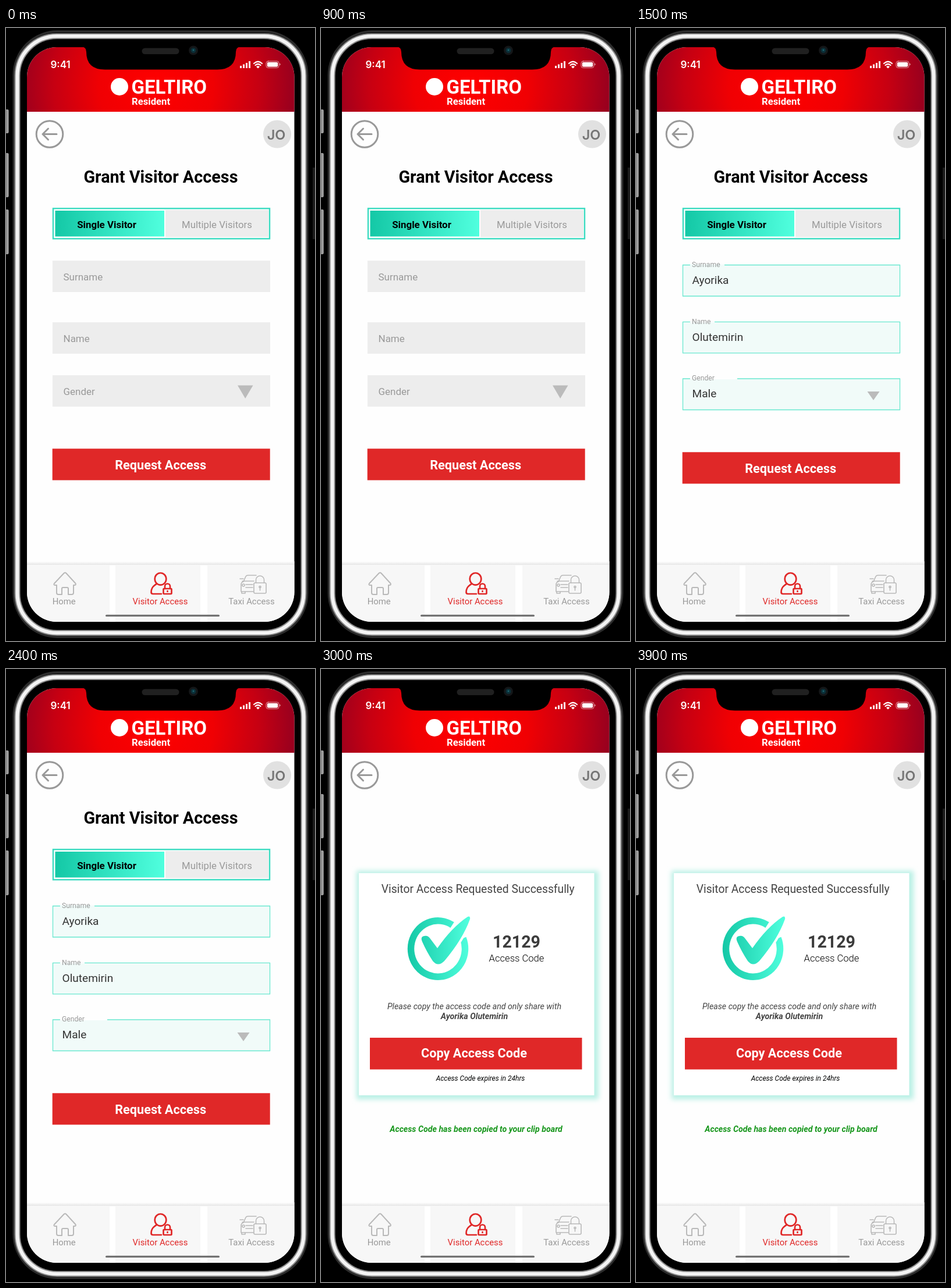
Animation of 531x1054 px, one loop 4.5 s. Source, as an HTML page:

```html
<!DOCTYPE html>
<html lang="en">
<head>
<meta charset="utf-8">
<title>Visitor access</title>
<style>
html, body { margin: 0; height: 100%; overflow: hidden; background: #000; }
svg { display: block; width: 100vw; height: 100vh; font-family: Roboto, sans-serif; }
.mid { text-anchor: middle; }
.b { font-weight: 700; }
.i { font-style: italic; }
.line { fill: none; stroke-linecap: round; stroke-linejoin: round; }
.tab { font-size: 14.9px; text-anchor: middle; }
.hint { font-size: 17px; fill: #999; }
.label { font-size: 12.2px; fill: #999; }
.value { font-size: 19.1px; fill: #333; }
.btn { font-size: 21.7px; font-weight: 700; fill: #fff; text-anchor: middle; }
.btnbox { fill: #e02828; }
</style>
</head>
<body>
<svg viewBox="0 0 531 1054">
<defs>
  <radialGradient id="red" gradientUnits="userSpaceOnUse" cx="258" cy="100" r="245">
    <stop offset="0" stop-color="#ff0000"/><stop offset=".4" stop-color="#f00003"/>
    <stop offset=".72" stop-color="#c60012"/><stop offset="1" stop-color="#930020"/>
  </radialGradient>
  <linearGradient id="teal"><stop offset="0" stop-color="#14c8a6"/><stop offset="1" stop-color="#50ffde"/></linearGradient>
  <linearGradient id="tick" gradientUnits="userSpaceOnUse" x1="149" y1="0" x2="256" y2="0">
    <stop offset="0" stop-color="#14c8a6"/><stop offset="1" stop-color="#50ffde"/>
  </linearGradient>
  <linearGradient id="key"><stop offset="0" stop-color="#666"/><stop offset="1" stop-color="#b4b4b4"/></linearGradient>
  <linearGradient id="fade" x2="0" y2="1"><stop offset="0" stop-color="#fff"/><stop offset="1" stop-color="#e6e6e6"/></linearGradient>
  <filter id="blur" x="-10%" y="-10%" width="120%" height="120%"><feGaussianBlur stdDeviation="4.500"/></filter>
  <clipPath id="screen"><rect x="36" y="33" width="459.500" height="988" rx="51"/></clipPath>
</defs>

<!-- phone body -->
<rect width="531" height="1054"/>
<g fill="url(#key)">
  <rect x="-3" y="140" width="7.500" height="41" rx="2"/>
  <rect x="-3" y="215" width="7.500" height="76" rx="2"/>
  <rect x="-3" y="312" width="7.500" height="77" rx="2"/>
</g>
<rect x="527" y="240" width="6" height="123" fill="#1c1c1c"/>
<g fill="none">
  <rect x="13.500" y="6" width="504" height="1041" rx="75" stroke="#2c2c2c" stroke-width="4"/>
  <rect x="19.500" y="14" width="492" height="1026" rx="68" stroke="#8c8c8c" stroke-width="10"/>
  <rect x="19.500" y="14" width="492" height="1026" rx="68" stroke="#f4f4f4" stroke-width="6"/>
</g>

<g clip-path="url(#screen)">
  <rect x="36" y="33" width="460" height="988" fill="#fefefe"/>
  <rect x="36" y="33" width="460" height="111" fill="url(#red)"/>

  <!-- tab bar -->
  <rect x="36" y="917" width="460" height="6" fill="url(#fade)"/>
  <rect x="36" y="923" width="460" height="98" fill="#f7f7f7"/>
  <path d="M178 924h10v97h-10zM334 924h12v97h-12z" fill="#fff"/>
  <g class="line" stroke="#b9b9b9" stroke-width="2">
    <path d="M83 955L99.500 937.500Q101.500 935.500 103.500 937.500L119.500 955Q121 958 117 958H116V971Q116 974 113 974H107V964Q107 962 105 962H98Q96 962 96 964V974H90Q87 974 87 971V958H85Q81 958 83 955Z"/>
    <g stroke-width="1.600">
      <path d="M425 969H404V957Q404 953 408 952L412 943Q413 941 416 941H430M406 951H426M402 947H408M412 957H424M412 962H424M405 969V972H411V969"/>
      <circle cx="408" cy="958" r="2"/>
      <rect x="426" y="954" width="21" height="18" rx="2"/>
      <path d="M429.500 954V949A7 7 0 0 1 443.500 949V954M436.500 962V967"/>
      <circle cx="436.500" cy="961" r="1.500"/>
    </g>
  </g>
  <g class="line" stroke="#e02828" stroke-width="2.700">
    <ellipse cx="265.500" cy="947.300" rx="9.800" ry="10.300"/>
    <path d="M258.500 956Q249.500 961 249.500 970Q249.500 973 252.500 973H267"/>
    <rect x="270.500" y="964" width="14" height="9" rx="1"/>
    <path d="M273 964V960A4.500 4.500 0 0 1 282 960V964M277.500 968V969"/>
  </g>
  <text class="tab" x="99.700" y="991" fill="#999">Home</text>
  <text class="tab" x="265" y="991" fill="#e02828">Visitor Access</text>
  <text class="tab" x="422" y="991" fill="#999">Taxi Access</text>
  <rect x="171" y="1008.700" width="196" height="3.400" rx="1.700" fill="#717171"/>
</g>

<!-- notch -->
<path d="M130 32Q138 33 138 41Q138 71.500 170 71.500H363Q395 71.500 395 41Q395 33 403 32Z"/>
<rect x="233.500" y="34.500" width="64" height="10.500" rx="5.250" fill="#202020"/>
<circle cx="322" cy="38.500" r="8" fill="#141618"/>
<circle cx="322" cy="38.500" r="4.500" fill="#0b2f38"/>
<circle cx="322" cy="38" r="1.500" fill="#1d6670"/>

<!-- status bar -->
<g fill="#fff">
  <text x="76.500" y="69" style="font:600 17px Inter,sans-serif">9:41</text>
  <path d="M402 65h3v4h-3zM407 62.500h3v6.500h-3zM412 60h3v9h-3zM417 57h3v12h-3z"/>
  <path d="M433 69.500L430 66.500Q433 64 436 66.500Z"/>
  <g class="line" stroke="#fff" stroke-width="2.200" stroke-linecap="butt">
    <path d="M426 61Q433 54.500 440 61M428.500 64Q433 60 437.500 64"/>
    <rect x="447" y="57" width="22" height="11.500" rx="3.500" stroke-width="1" opacity=".6"/>
  </g>
  <rect x="448.800" y="58.800" width="18.400" height="8" rx="2"/>
  <path d="M470.500 60.500q2 2 0 4z"/>

  <circle cx="195" cy="101" r="15"/>
  <text class="b" x="215.500" y="113" font-size="33">GELTIRO</text>
  <text class="b" x="216" y="132" font-size="16.700">Resident</text>
</g>

<!-- top controls -->
<g class="line" stroke="#999" stroke-width="3">
  <circle cx="75" cy="182.500" r="22.800"/>
  <path d="M87 182.500H63.500M72.500 173L63 182.500L72.500 192"/>
</g>
<circle cx="466" cy="182.500" r="24" fill="#e1e1e1"/>
<text class="mid" x="464.500" y="192" fill="#757575" style="font:600 23.500px Inter,sans-serif">JO</text>

<g id="form">
  <text class="b mid" x="266" y="266" font-size="28.800">Grant Visitor Access</text>
  <rect x="81" y="310.300" width="372" height="52" fill="#fff" stroke="#3adbc0" stroke-width="2.400"/>
  <rect x="274" y="313" width="177" height="46.500" fill="#ededed"/>
  <rect x="84.500" y="314" width="187.500" height="44.500" fill="url(#teal)"/>
  <text class="b mid" x="173" y="344" font-size="16.900">Single Visitor</text>
  <text class="mid" x="362.500" y="344" font-size="16.800" fill="#999">Multiple Visitors</text>
</g>

<g id="empty">
  <path d="M80 400h374v54H80zM80 506h374v54H80zM80 597h374v54H80z" fill="#ededed"/>
  <text class="hint" x="98.500" y="433.500">Surname</text>
  <text class="hint" x="98.500" y="540">Name</text>
  <text class="hint" x="98.500" y="630.500">Gender</text>
  <path d="M398 614.500H424.500L411.200 637Z" fill="#bbb"/>
  <rect class="btnbox" x="79.700" y="723.300" width="374" height="54.200"/>
  <text class="btn" x="265.700" y="758.500">Request Access</text>
</g>

<g id="filled">
  <path d="M80.500 407.500h373v53.500h-373zM80.500 505.300h373v53.500h-373zM80.500 603h373v53.500h-373z" fill="#f1fbf9" stroke="#68e8cf" stroke-width="1.300"/>
  <path d="M93 406.500h59v2h-59zM93 504.300h42v2h-42zM93 602h81v2h-81z" fill="#fff"/>
  <text class="label" x="96" y="410.500">Surname</text>
  <text class="label" x="96" y="508.500">Name</text>
  <text class="label" x="96" y="606">Gender</text>
  <text class="value" x="96.500" y="439.500">Ayorika</text>
  <text class="value" x="96.500" y="537.500">Olutemirin</text>
  <text class="value" x="96.500" y="635">Male</text>
  <path d="M397.500 625H418.500L408 640Z" fill="#bbb"/>
  <rect class="btnbox" x="79.700" y="729.300" width="374" height="54.200"/>
  <text class="btn" x="265.700" y="764.500">Request Access</text>
</g>

<g id="done">
  <rect x="61" y="347" width="416" height="393" fill="#b9f0e5" filter="url(#blur)"/>
  <rect x="65" y="351" width="404.500" height="382" fill="#fff"/>
  <text class="mid" x="269.700" y="385" font-size="19.300" fill="#444">Visitor Access Requested Successfully</text>

  <path d="M225.600 440.100A46.500 48.200 0 1 0 244.100 462.900" fill="none" stroke="url(#tick)" stroke-width="11.500"/>
  <path d="M174 469Q170 460 178 459Q184 458 188 464L200 480Q225 444 252 426Q257 424 256 430Q244 464 212 502Q201 513 192 502Q182 487 174 469Z" fill="url(#tick)" stroke="#fff" stroke-width="8" paint-order="stroke"/>

  <text class="b mid" x="336" y="479" font-size="28.600" fill="#3c3c3c">12129</text>
  <text class="mid" x="336" y="503" font-size="16.600" font-weight="300">Access Code</text>
  <g class="i mid" font-size="14.200" fill="#444">
    <text x="263.500" y="585">Please copy the access code and only share with</text>
    <text class="b" x="263.500" y="601.500">Ayorika Olutemirin</text>
    <text class="b" x="266.500" y="795.500" fill="#16961b">Access Code has been copied to your clip board</text>
    <text x="274" y="708" font-size="12" fill="#000">Access Code expires in 24hrs</text>
  </g>
  <rect class="btnbox" x="84" y="634" width="364.500" height="54.500"/>
  <text class="btn" x="263" y="668">Copy Access Code</text>
</g>
</svg>
<script>
const STEP = 1500;
const scenes = [["form", "empty"], ["form", "filled"], ["done"]];
const ids = ["form", "empty", "filled", "done"];

function draw(now) {
  const scene = scenes[Math.floor(now / STEP) % scenes.length];
  for (const id of ids) {
    document.getElementById(id).style.display = scene.includes(id) ? "" : "none";
  }
}

const start = performance.now();
function tick(now) {
  draw(Math.max(0, now - start));
  requestAnimationFrame(tick);
}
tick(start);
</script>
</body>
</html>
```
